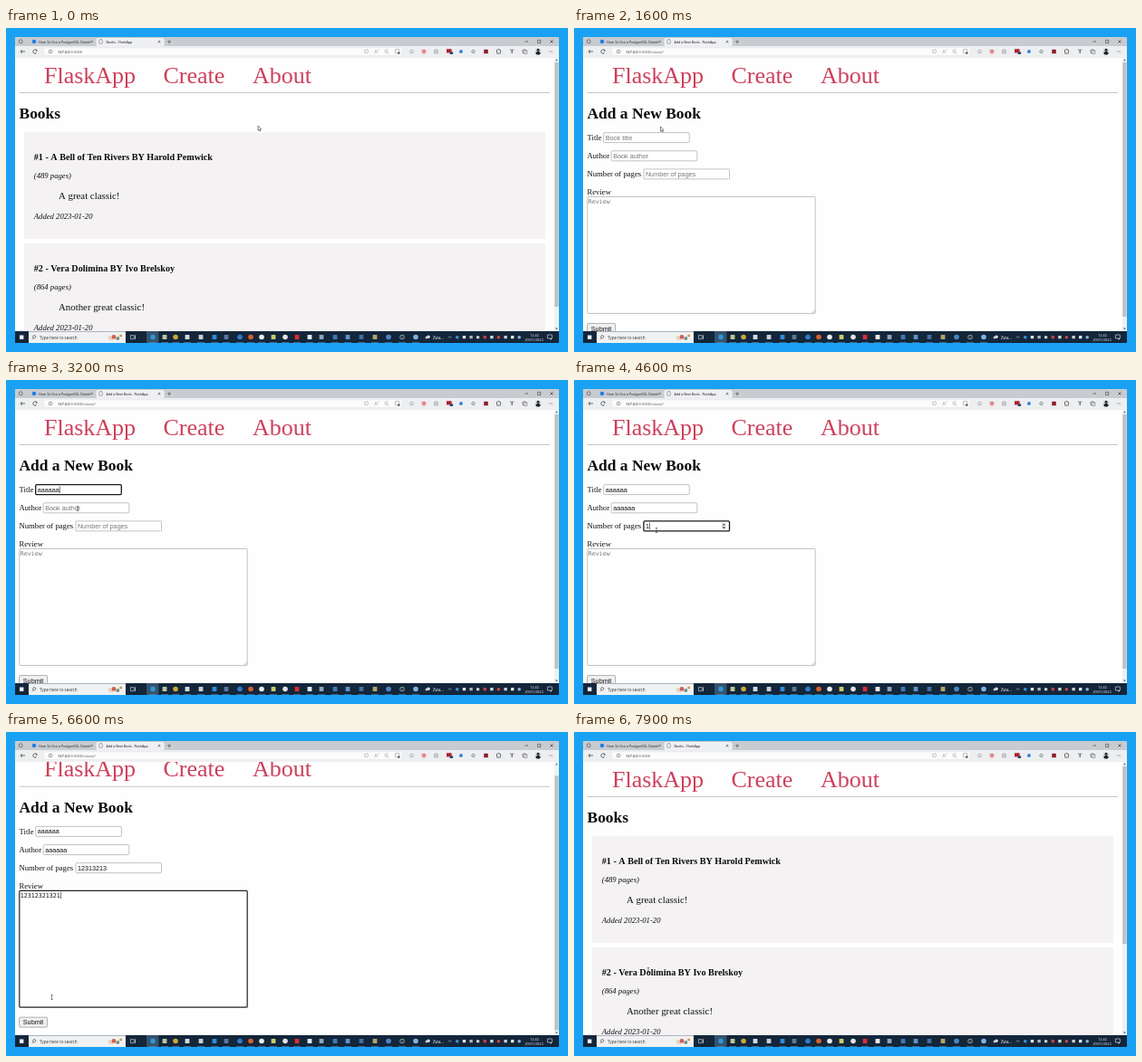
Write an HTML page with a canvas that moves like this. It is 620x358 px and loops after 8 s.

```html
<!DOCTYPE html>
<html lang="en">
<head>
<meta charset="utf-8">
<title>Books - FlaskApp</title>
<style>
html, body { margin: 0; width: 100%; height: 100%; overflow: hidden; background: #1ba1f4; }
canvas { display: block; width: 620px; height: 358px; }
</style>
</head>
<body>
<canvas id="stage"></canvas>
<script>
const LOOP = 8000;
const W = 620, H = 358;
const canvas = document.getElementById('stage');
const ctx = canvas.getContext('2d');
const dpr = window.devicePixelRatio || 1;
canvas.width = W * dpr;
canvas.height = H * dpr;

const SERIF = '"Liberation Serif", "Times New Roman", serif';
const SANS = '"Liberation Sans", Arial, sans-serif';
const UI = '"Open Sans", "Noto Sans", sans-serif';
const MONO = '"DejaVu Sans Mono", monospace';
const BAR = '#eeeff1';

// Timeline in ms
const OPEN_FORM = 1050, SENT = 7350;
const FOCUS = [2150, 3400, 4350, 5350];
const PATH = [
  [0, 278, 108], [250, 278, 108], [800, 205, 56], [1150, 205, 56], [1600, 95.5, 109],
  [2050, 80, 121], [2800, 80, 121], [3150, 79, 142], [4100, 79, 142], [4350, 91, 166],
  [5000, 91, 166], [5300, 42, 291], [5800, 42.5, 293], [6200, 42.5, 293], [6600, 50.7, 293],
  [6750, 50.7, 293], [7100, 34, 321], [7350, 34, 321], [7850, 82, 263], [8000, 82, 263]
];
const FIELDS = [
  { label: 'Title', hint: 'Book title', x: 32.5, y: 115.5, text: 'aaaaaa', start: 2450, step: 110 },
  { label: 'Author', hint: 'Book author', x: 41, y: 135.7, text: 'aaaaaa', start: 3600, step: 90 },
  { label: 'Number of pages', hint: 'Number of pages', x: 76.7, y: 155.8, text: '12313213', start: 4550, step: 75 }
];
const REVIEW = { text: '12312321321', start: 5480, step: 70 };
const BOOKS = [
  ['#1 - A Bell of Ten Rivers BY Harold Pemwick', '(489 pages)', 'A great classic!'],
  ['#2 - Vera Dolimina BY Ivo Brelskoy', '(864 pages)', 'Another great classic!']
];

const clamp = v => Math.max(0, Math.min(1, v));
const ease = v => { v = clamp(v); return v * v * (3 - 2 * v); };

function rect(x, y, w, h, fill) {
  ctx.fillStyle = fill;
  ctx.fillRect(x, y, w, h);
}
function box(x, y, w, h, r, fill, stroke, lw = 0.6) {
  ctx.beginPath();
  ctx.roundRect(x, y, w, h, r);
  if (fill) { ctx.fillStyle = fill; ctx.fill(); }
  if (stroke) { ctx.strokeStyle = stroke; ctx.lineWidth = lw; ctx.stroke(); }
}
function disc(x, y, r, fill) {
  ctx.beginPath();
  ctx.arc(x, y, r, 0, 7);
  ctx.fillStyle = fill;
  ctx.fill();
}
function ring(x, y, r, color, lw = 0.6, from = 0, to = 6.3) {
  ctx.beginPath();
  ctx.arc(x, y, r, from, to);
  ctx.strokeStyle = color;
  ctx.lineWidth = lw;
  ctx.stroke();
}
function line(pts, color, lw = 0.6) {
  ctx.beginPath();
  for (let i = 0; i < pts.length; i += 2) ctx.lineTo(pts[i], pts[i + 1]);
  ctx.strokeStyle = color;
  ctx.lineWidth = lw;
  ctx.stroke();
}
function poly(pts, fill) {
  ctx.beginPath();
  for (let i = 0; i < pts.length; i += 2) ctx.lineTo(pts[i], pts[i + 1]);
  ctx.closePath();
  ctx.fillStyle = fill;
  ctx.fill();
}
function text(s, x, y, size, family, color = '#111', style = '') {
  ctx.font = `${style} ${size}px ${family}`;
  ctx.fillStyle = color;
  ctx.fillText(s, x, y);
  return ctx.measureText(s).width;
}
function cross(x, y, r, color) {
  line([x - r, y - r, x + r, y + r], color);
  line([x - r, y + r, x + r, y - r], color);
}

function typed(f, t) {
  const n = Math.floor((t - f.start) / f.step) + 1;
  return f.text.slice(0, Math.max(0, n));
}
function focusAt(t) {
  return FOCUS.filter(f => t >= f).length - 1;
}
function caret(x, y, h, t, since) {
  if ((t - since) % 1060 < 530) rect(x, y, 0.6, h, '#111');
}

function drawBrowser(form) {
  rect(10, 10, 600, 10.5, '#c8cbd0');
  rect(10, 20, 600, 13, BAR);
  box(14.5, 13, 3.5, 3.8, 1, null, '#444');
  disc(31, 15, 2.3, '#2a7de1');
  text('How To Use a PostgreSQL Datab', 36, 16.6, 3.8, UI, '#222');
  cross(94.5, 15.2, 1.2, '#444');
  box(99.5, 11, 75, 10, [2.5, 2.5, 0, 0], BAR);
  box(103, 12.8, 3.2, 4.4, 0.4, '#fff', '#444', 0.5);
  text(form ? 'Add a New Book - FlaskApp' : 'Books - FlaskApp', 110.5, 16.6, 3.65, UI, '#111');
  cross(169, 15.2, 1.2, '#333');
  line([178, 15.2, 182, 15.2], '#444');
  line([180, 13.2, 180, 17.2], '#444');

  line([572.5, 15, 576, 15], '#222');
  box(586.5, 13.4, 3.2, 3.2, 0, null, '#222', 0.5);
  cross(602, 15, 1.6, '#222');

  line([21, 26, 16, 26], '#333', 0.7);
  line([18, 24, 16, 26, 18, 28], '#333', 0.7);
  ring(32, 26, 2.2, '#333', 0.7, 0.5, 5.8);
  poly([33, 23.4, 35, 25.3, 33, 25.6], '#333');
  box(41.5, 21.8, 396, 8.6, 2, '#fcfcfd', '#dfe1e4', 0.5);
  ring(49, 26, 2, '#555', 0.5);
  rect(48.75, 25.5, 0.5, 1.7, '#555');
  rect(48.75, 24.6, 0.5, 0.5, '#555');
  let x = 57;
  x += text('127.0.0.1', x, 27.6, 4, UI, '#000');
  text(':5000' + (form ? '/create/' : ''), x, 27.6, 4, UI, '#555');

  box(395.5, 24, 4, 3.6, 1, null, '#888', 0.5);
  text('A', 406.5, 28, 5, UI, '#888');
  line([410.5, 23.8, 411.4, 25.6], '#888', 0.5);
  ring(419.5, 25.6, 1.6, '#888', 0.5);
  line([420.7, 26.8, 422.2, 28.3], '#888', 0.5);
  box(429.5, 23.6, 4.4, 4.4, 1, null, '#777', 0.5);
  disc(433.4, 27.6, 1.2, '#444');
  ring(447.5, 26, 1.8, '#9aa0a6', 0.8);
  ring(461, 26, 1.9, '#d8343f', 0.8);
  disc(461, 26, 0.8, '#d8343f');
  box(472.5, 24, 4, 4, 0.6, '#c9ccd0', '#999', 0.5);
  rect(486, 23.2, 5.6, 4.2, '#b3202f');
  rect(489.5, 26.2, 3.6, 2.8, '#3a4a78');
  disc(502, 26, 1.9, '#2b82d9');
  ring(515.5, 26, 1.6, '#777', 0.9);
  box(527.2, 23.7, 4.6, 4.6, 0.5, '#8a1f2a');
  box(541.5, 23.8, 4, 4.4, 0.8, null, '#333', 0.7);
  line([556, 24.2, 560.5, 24.2], '#444');
  line([558.2, 24.2, 558.2, 28], '#444', 1);
  box(570, 24, 3.8, 3.6, 0.5, null, '#444');
  box(571.3, 25, 3.6, 3.4, 0.5, BAR, '#444', 0.5);
  disc(587, 26, 4, '#e0e3e6');
  disc(587, 24.2, 1.5, '#222');
  box(584.4, 26, 5.2, 3.4, [2, 2, 1.4, 1.4], '#222');
  for (let i = 0; i < 3; i++) disc(599.5 + i * 1.6, 26, 0.45, '#333');
}

function drawNav(heading) {
  const pink = '#cd405a';
  text('FlaskApp', 42, 60.6, 26, SERIF, pink);
  text('Create', 173.5, 60.6, 26, SERIF, pink);
  text('About', 272, 60.6, 26, SERIF, pink);
  rect(14.5, 71, 585.5, 0.8, '#b9b9b9');
  text(heading, 14.5, 99.9, 17.45, SERIF, '#0b0b0b', 'bold');
}

function drawBooks() {
  drawNav('Books');
  BOOKS.forEach(([title, pages, review], i) => {
    ctx.save();
    ctx.translate(0, i * 122.7);
    rect(20, 115.3, 575, 117.7, '#f4f2f3');
    text(title, 30.8, 146, 10.14, SERIF, '#0b0b0b', 'bold');
    text(pages, 30.8, 166.3, 8.67, SERIF, '#111', 'italic');
    text(review, 58, 189.2, 10.83, SERIF);
    text('Added 2023-01-20', 30.8, 211, 8.67, SERIF, '#111', 'italic');
    ctx.restore();
  });
}

function drawForm(t) {
  const focus = focusAt(t);
  drawNav('Add a New Book');
  FIELDS.forEach((f, i) => {
    const on = focus === i, val = typed(f, t);
    text(f.label, 14.5, f.y + 8.2, 8.67, SERIF);
    box(f.x + 0.2, f.y + 0.1, 94.6, 11, 1.2, '#fff', on ? '#1a1a1a' : '#999', on ? 1.3 : 0.6);
    const w = text(val || f.hint, f.x + 2.2, f.y + 8.1, 7.22, SANS, val ? '#111' : '#777');
    if (on) caret(f.x + 2.3 + (val ? w : 0), f.y + 1.9, 7.6, t, Math.max(FOCUS[i], f.start + f.step * val.length));
    if (on && i === 2) {
      const x = f.x + 88.6, y = f.y + 5.6;
      box(x - 2.8, y - 4, 5.6, 8, 0.5, '#efefef');
      poly([x - 1.8, y - 0.8, x, y - 3, x + 1.8, y - 0.8], '#444');
      poly([x - 1.8, y + 0.8, x, y + 3, x + 1.8, y + 0.8], '#444');
    }
  });

  const on = focus === 3, val = typed(REVIEW, t);
  text('Review', 14.5, 184, 8.67, SERIF);
  box(14.8, 186.5, 251.4, 128.9, 1, '#fff', on ? '#222' : '#999', on ? 1.2 : 0.6);
  const w = text(val || 'Review', 15.8, 194, 6.65, MONO, val ? '#111' : '#777');
  if (on) caret(16 + (val ? w : 0), 188, 7.5, t, REVIEW.start + REVIEW.step * val.length);
  line([262.5, 315, 266, 311.5], '#888', 0.5);
  line([264.5, 315, 266, 313.5], '#888', 0.5);
  box(14.6, 326.4, 31, 11, 1.3, '#efefef', '#808080', 0.6);
  text('Submit', 18.8, 334.5, 7.22, SANS);
}

function drawScrollbar(y, h) {
  rect(604.8, 33, 5.2, 302, '#f1f1f1');
  poly([605.9, 36.3, 607.4, 34.5, 608.9, 36.3], '#666');
  poly([605.9, 331.6, 607.4, 333.4, 608.9, 331.6], '#666');
  rect(605.2, y, 4.4, h, '#c1c1c1');
}

// Taskbar marks: x, colour, shape (1 round, 0 square)
const APPS = [
  [162, '#2d9bd8', 1], [175, '#b9c7a0', 0], [187, '#c9a93a', 1], [200, '#d5d9de', 0],
  [215, '#c9ced6', 0], [230, '#2b8fdc', 0], [243, '#5f7896', 0], [258, '#2f7fd0', 1],
  [270, '#d9622f', 1], [282, '#eceff1', 1], [295, '#c7cc6b', 0], [308, '#dfe3e6', 1],
  [321, '#d92f36', 0], [335, '#e8eaec', 0], [348, '#8fa3ba', 0], [363, '#3c78b5', 0],
  [377, '#5b93c8', 0], [392, '#3e6f9e', 0], [407, '#b2a56a', 0], [422, '#4f86c6', 1],
  [437, '#7f8b98', 1], [452, '#7fb2e8', 1]
];
const TRAY = ['#2f9be8', '#dfe5ea', '#aab7c4', '#cfd6dc', '#c9414a', '#cfd6dc', '#d8463f', '#c9d1d8', '#e3e8ec', '#8fb4d8'];

function drawTaskbar() {
  rect(10, 335, 600, 13, '#14263a');
  rect(15, 339.5, 4.4, 4.4, '#eef3f7');
  rect(25, 335.3, 107, 12.7, '#f0f1f2');
  ring(31.2, 341.2, 1.6, '#333', 0.6);
  line([30.1, 342.5, 28.8, 344], '#333', 0.6);
  text('Type here to search', 37, 343.6, 4.55, UI, '#333');
  box(113, 340, 6, 5, 2, '#e6d0c4');
  disc(119, 341.4, 2.3, '#c9604f');
  disc(123.3, 343, 2, '#6f8f84');
  disc(126.6, 340, 1.5, '#d8955a');

  box(137.5, 339.6, 3.6, 4, 0, null, '#dfe5ea', 0.6);
  rect(142, 339.4, 0.8, 4.4, '#dfe5ea');
  rect(155, 335, 13.5, 13, '#36536d');
  for (const [x, c, round] of APPS) {
    if (round) disc(x, 341.5, 2.8, c);
    else box(x - 2.4, 339.1, 4.8, 4.8, 0.5, c);
    rect(x - 4, 347.4, 8, 0.6, '#5f93bb');
  }
  box(435.4, 340.2, 3.2, 2.6, 0.4, '#222c37');
  disc(464, 342, 1.5, '#aebdca');
  disc(466, 341.2, 1.8, '#d4dde4');
  text('Zwa...', 471, 343.5, 4.4, UI, '#eef2f5');
  line([488, 342.4, 489.6, 340.8, 491.2, 342.4], '#e8edf0');
  TRAY.forEach((c, i) => {
    if (i % 3) box(496.2 + i * 7.6, 340.1, 3.4, 3.2, 0.5, c);
    else disc(497.8 + i * 7.6, 341.7, 1.8, c);
  });
  ctx.textAlign = 'center';
  text('12:42', 583, 340.6, 3.8, UI, '#f0f3f5');
  text('20/01/2023', 582.5, 346.2, 3.8, UI, '#f0f3f5');
  ctx.textAlign = 'left';
  box(597.4, 339, 5, 4, 0.3, null, '#eef2f5', 0.6);
  poly([600, 343, 602, 343, 601.4, 344.8], '#eef2f5');
}

function pointer(t) {
  let i = 1;
  while (i < PATH.length - 1 && PATH[i][0] < t) i++;
  const [t0, x0, y0] = PATH[i - 1], [t1, x1, y1] = PATH[i];
  const k = ease((t - t0) / (t1 - t0));
  return [x0 + (x1 - x0) * k, y0 + (y1 - y0) * k];
}
function pointerKind(x, y, form, scroll) {
  y += scroll;
  const inside = (l, top, w, h) => x > l && x < l + w && y > top && y < top + h;
  if (inside(173, 38, 70, 28)) return 'hand';
  if (form) {
    if (FIELDS.some(f => inside(f.x, f.y, 95, 11.2)) || inside(14.5, 186, 252, 129.5)) return 'beam';
  } else if (inside(30, 259, 156, 12)) return 'beam';
  return 'arrow';
}
function drawPointer(x, y, kind) {
  if (kind === 'beam') {
    rect(x - 0.3, y - 2.6, 0.6, 5.2, '#333');
    rect(x - 1.2, y - 2.9, 2.4, 0.5, '#333');
    rect(x - 1.2, y + 2.4, 2.4, 0.5, '#333');
    return;
  }
  ctx.save();
  ctx.translate(x, y);
  ctx.beginPath();
  const pts = kind === 'hand'
    ? [-0.6, 0, 0.5, 0, 0.5, 2.4, 3, 3, 2.6, 6.4, -0.6, 6.4, -2.2, 3.8, -0.6, 4]
    : [0, 0, 0, 5.2, 1.2, 4.2, 2, 6, 2.8, 5.6, 2, 3.9, 3.6, 3.8];
  for (let i = 0; i < pts.length; i += 2) ctx.lineTo(pts[i], pts[i + 1]);
  ctx.closePath();
  ctx.fillStyle = '#fff';
  ctx.fill();
  ctx.strokeStyle = '#222';
  ctx.lineWidth = 0.55;
  ctx.stroke();
  ctx.restore();
}

function draw(t) {
  const form = t >= OPEN_FORM && t < SENT;
  const scroll = form ? 11.2 * ease((t - 6300) / 150) : 0;
  ctx.setTransform(dpr, 0, 0, dpr, 0, 0);
  rect(0, 0, W, H, '#1ba1f4');
  rect(10, 10, 600, 338, '#fefefe');

  ctx.save();
  ctx.beginPath();
  ctx.rect(10, 33, 595, 302);
  ctx.clip();
  ctx.translate(0, -scroll);
  if (form) drawForm(t); else drawBooks();
  ctx.restore();

  drawBrowser(form);
  drawScrollbar(38 + scroll * 0.93, form ? 281 : t < OPEN_FORM ? 270 : 196);
  drawTaskbar();
  const [x, y] = pointer(t);
  drawPointer(x, y, pointerKind(x, y, form, scroll));
}

const begin = performance.now();
function tick() {
  draw((performance.now() - begin) % LOOP);
  requestAnimationFrame(tick);
}
tick();
</script>
</body>
</html>
```
